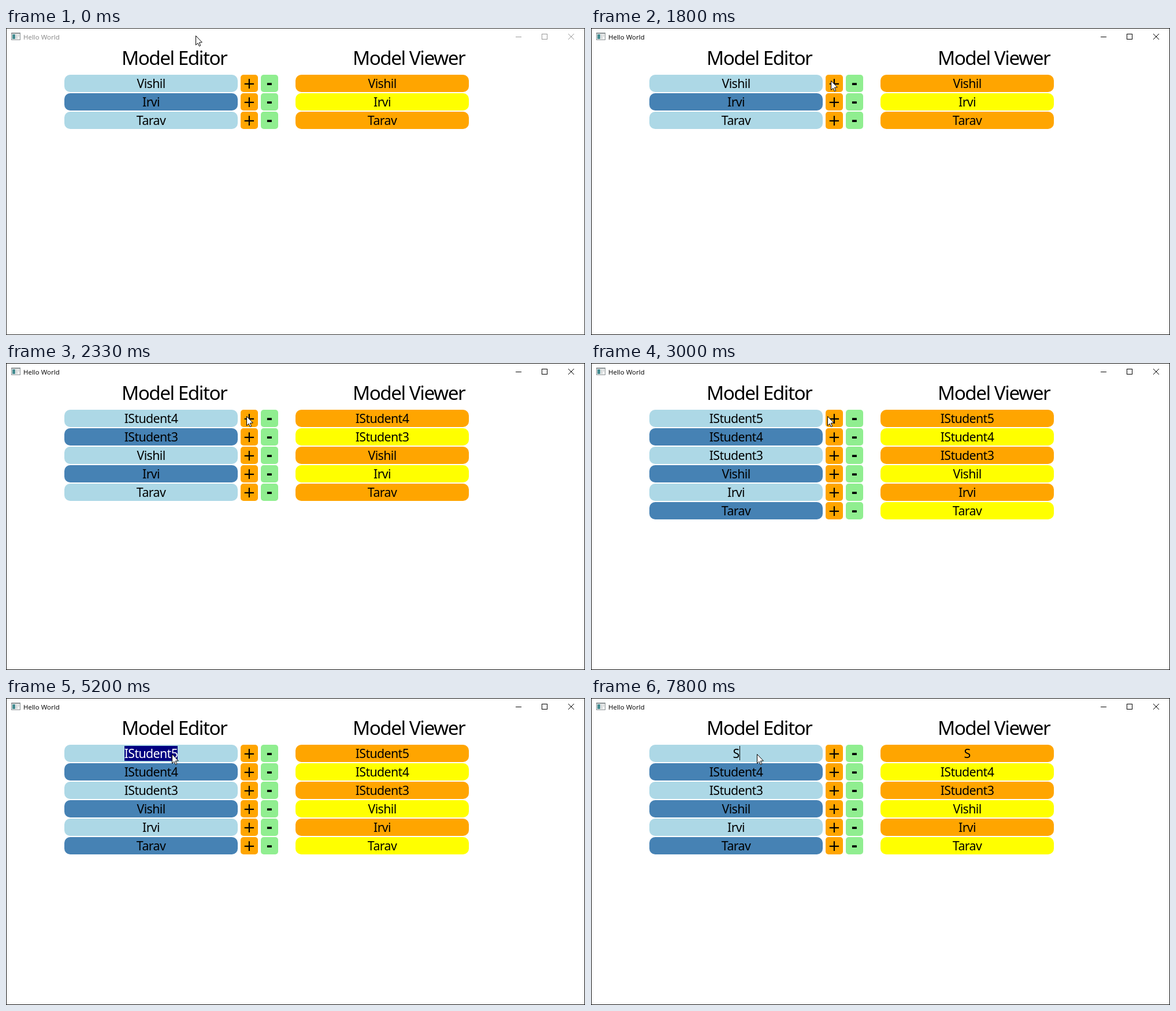
These frames come from a looping animation (1002 px wide and 532 px high, 8 s). An HTML page with a canvas:

```html
<!DOCTYPE html>
<html lang="en">
<head>
<meta charset="utf-8">
<title>Hello World</title>
<style>
  html, body { margin: 0; width: 100%; height: 100%; overflow: hidden; background: #fff; }
  canvas { display: block; }
</style>
</head>
<body>
<canvas id="stage" width="1002" height="532"></canvas>
<script>
const ctx = document.getElementById('stage').getContext('2d');
const LOOP = 8000, FPS = 15;
const ROW_TOP = 81, ROW_PITCH = 32, ROW_H = 30;
const EDIT_X = 251, VIEW_X = 651;

const STYLES = {
  caption: { font: '11.5px "Open Sans", sans-serif', spacing: '0px' },
  heading: { font: '33.3px "Noto Sans", sans-serif', spacing: '-1.5px' },
  row: { font: '21.33px "Noto Sans", sans-serif', spacing: '-0.6px' },
  plus: { font: '26px "DejaVu Sans", sans-serif', spacing: '0px' },
  minus: { font: 'bold 26px "DejaVu Sans", sans-serif', spacing: '0px' }
};

const PEOPLE = ['Vishil', 'Irvi', 'Tarav'];
const ACTIVATE = 1800;
const FIRST_INSERT = 1930, INSERT_GAP = 400, INSERT_COUNT = 3;
const CLICK = 4670, SELECT = 4870, BLINK = 530;
const TYPED = 'sUA';
const TYPE_START = 5870, TYPE_GAP = 300;
const ERASE_START = 6840, ERASE_GAP = 160;
const RETYPE = 7800;

// Pointer glides between resting places
const HOME = { x: 328, y: 13 };
const GLIDES = [
  { from: 400, to: 870, x: 252, y: 85 },
  { from: 870, to: 1530, x: 411, y: 92 },
  { from: 1600, to: 1730, x: 415, y: 91 },
  { from: 2000, to: 2070, x: 416, y: 92 },
  { from: 2930, to: 3400, x: 298, y: 93 },
  { from: 3800, to: 3930, x: 290, y: 94 },
  { from: 4070, to: 4200, x: 303, y: 96 },
  { from: 4330, to: 4670, x: 287, y: 97 }
];

const ARROW = new Path2D('M.5 .5V16.5L4 13.2L6.4 18.5L8.7 17.5L6.4 12.2L11.3 11.8Z');

const clamp = (v, lo, hi) => Math.min(hi, Math.max(lo, v));
const smooth = k => k * k * (3 - 2 * k);

// How many evenly spaced events have happened by time t
const countSince = (t, start, gap, max) =>
  clamp(Math.floor((t - start) / gap) + 1, 0, max);

function pointerAt(t) {
  let { x, y } = HOME;
  for (const g of GLIDES) {
    const k = smooth(clamp((t - g.from) / (g.to - g.from), 0, 1));
    x += (g.x - x) * k;
    y += (g.y - y) * k;
  }
  return [Math.round(x), Math.round(y)];
}

function editedText(t) {
  if (t >= RETYPE) return 'S';
  const typed = countSince(t, TYPE_START, TYPE_GAP, TYPED.length);
  const erased = countSince(t, ERASE_START, ERASE_GAP, TYPED.length);
  return TYPED.slice(0, typed - erased);
}

function rect(x, y, w, h, color) {
  ctx.fillStyle = color;
  ctx.fillRect(x, y, w, h);
}

function pill(x, y, w, r, color) {
  ctx.fillStyle = color;
  ctx.beginPath();
  ctx.roundRect(x, y, w, ROW_H, r);
  ctx.fill();
}

function useStyle(name) {
  ctx.font = STYLES[name].font;
  ctx.letterSpacing = STYLES[name].spacing;
}

function label(text, x, y, style, color = '#000', align = 'center') {
  useStyle(style);
  ctx.textAlign = align;
  ctx.fillStyle = color;
  ctx.fillText(text, x, y);
}

function drawWindow(active) {
  const ink = active ? '#000' : '#999';
  rect(0, 0, 1002, 532, '#fff');
  ctx.lineWidth = 1;
  ctx.strokeStyle = active ? '#111' : '#2b2b2b';
  ctx.strokeRect(0.5, 0.5, 1001, 531);

  rect(9, 8, 16, 13, '#8b9294');
  rect(10, 10, 14, 10, '#f4f4f4');
  rect(11, 11, 5, 8, '#458b90');
  rect(17, 11, 3, 8, '#d5d9da');
  rect(21, 11, 2, 4, '#d5d9da');
  label('Hello World', 30, 20, 'caption', active ? '#000' : '#858585', 'left');

  rect(882, 15, 10, 1, ink);
  ctx.strokeStyle = ink;
  ctx.strokeRect(927.5, 10.5, 9, 9);
  ctx.stroke(new Path2D('M973 10L983 20M983 10L973 20'));

  label('Model Editor', 200, 64, 'heading', '#000', 'left');
  label('Model Viewer', 600, 64, 'heading', '#000', 'left');
}

function drawRow(text, index, y) {
  const odd = index % 2;
  pill(101, y, 300, 10, odd ? '#4682b4' : '#add8e6');
  pill(406, y, 30, 5, '#ffa500');
  pill(441, y, 30, 5, '#90ee90');
  pill(501, y, 300, 10, odd ? '#ffff00' : '#ffa500');
  label(text, EDIT_X, y + 23, 'row');
  label('+', 421, y + 24, 'plus');
  label('-', 456, y + 24, 'minus');
  label(text, VIEW_X, y + 23, 'row');
}

function drawEditing(t, text) {
  if (t < CLICK) return;
  useStyle('row');
  const typing = t >= TYPE_START;
  const width = ctx.measureText(text).width;
  const left = Math.round(EDIT_X - width / 2);
  const right = Math.round(EDIT_X + width / 2);
  const beforeLast = left + Math.round(ctx.measureText(text.slice(0, -1)).width);

  if (t >= SELECT && !typing) {
    rect(left, 83, right - left, 26, '#000080');
    label(text, EDIT_X, ROW_TOP + 23, 'row', '#fff');
  }
  if (typing || Math.floor((t - CLICK) / BLINK) % 2 === 0) {
    rect(t < SELECT ? beforeLast : right, 83, 1, 25, '#000');
  }
}

function drawPointer([x, y]) {
  ctx.save();
  ctx.translate(x, y);
  ctx.fillStyle = '#fff';
  ctx.fill(ARROW);
  ctx.strokeStyle = '#000';
  ctx.stroke(ARROW);
  ctx.restore();
}

function draw(t) {
  const added = countSince(t, FIRST_INSERT, INSERT_GAP, INSERT_COUNT);
  const names = [...PEOPLE];
  for (let i = 0; i < added; i++) names.unshift('IStudent' + (3 + i));
  if (t >= TYPE_START) names[0] = editedText(t);

  drawWindow(t >= ACTIVATE);
  // The first inserted row sits above the list until the next insertion.
  const top = added === 1 ? ROW_TOP - ROW_PITCH : ROW_TOP;
  names.forEach((name, i) => drawRow(name, i, top + i * ROW_PITCH));
  drawEditing(t, names[0]);
  drawPointer(pointerAt(t));
}

const start = performance.now();

function tick() {
  const t = (performance.now() - start) % LOOP;
  const step = Math.floor((t + 4) * FPS / 1000);
  draw(Math.round(step * 100 / FPS) * 10 % LOOP);
  requestAnimationFrame(tick);
}

tick();
</script>
</body>
</html>
```
